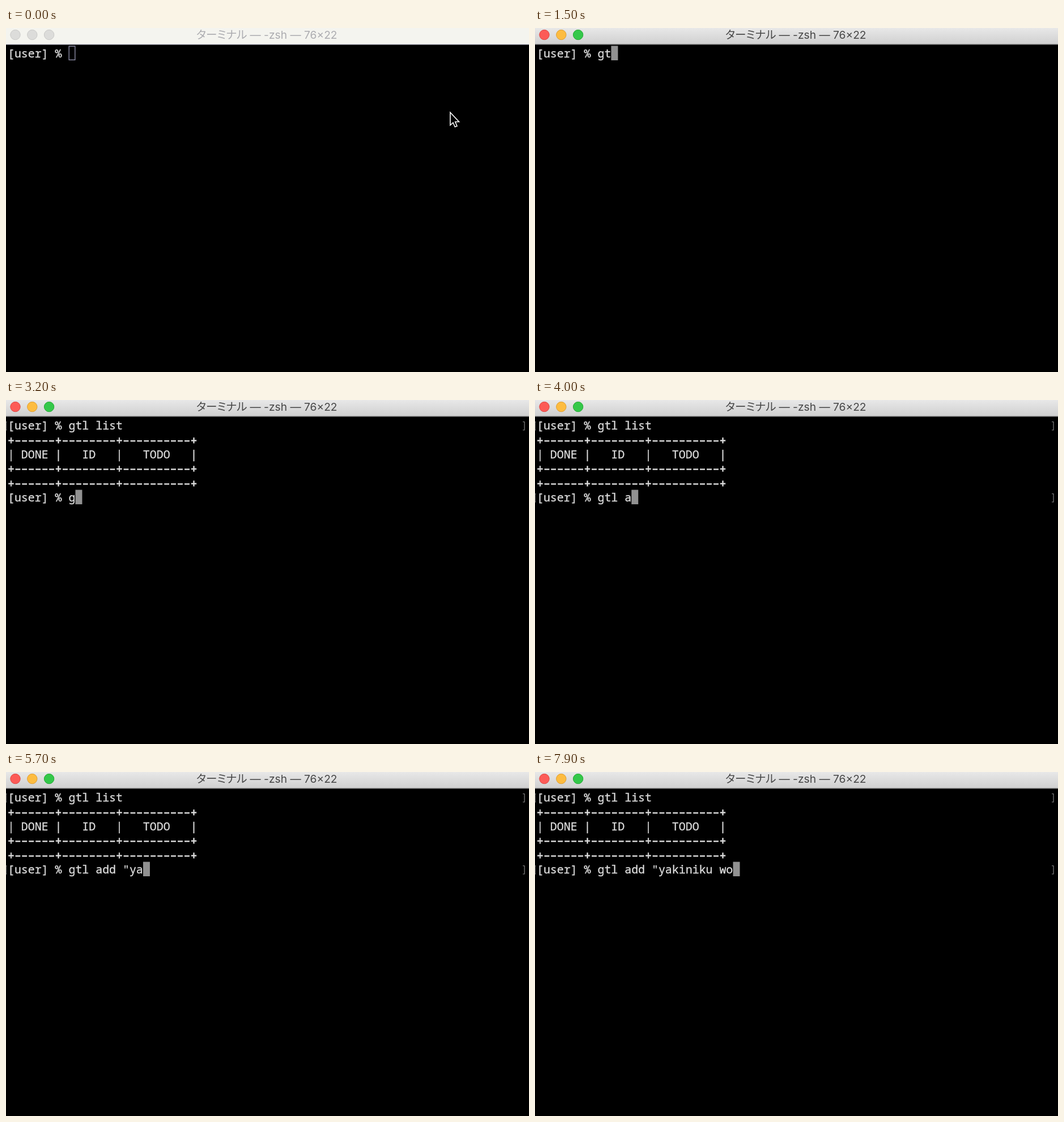
Write an HTML page that moves like this. It is 923 px wide and 607 px high and loops after 8000 ms.

```html
<!DOCTYPE html>
<html lang="ja">
<head>
<meta charset="utf-8">
<style>
  html, body { margin: 0; width: 100%; height: 100%; overflow: hidden; background: #000; }
  svg { display: block; width: 923px; height: 607px; }
  .term text {
    font: 500 19.92px "Noto Sans Mono", "DejaVu Sans Mono", monospace;
    fill: #dcdcdc; stroke: #dcdcdc; stroke-width: .35; white-space: pre;
  }
  .term .rule { stroke-width: .8; }
  .title { font: 19.2px Inter, "Noto Sans CJK JP", "Noto Sans CJK", sans-serif; }
  .kana { font: 350 19.6px "Noto Sans CJK JP", "Noto Sans CJK", sans-serif; font-feature-settings: "palt"; }
  .mark { fill: none; stroke: #858585; stroke-width: 1.2; }
</style>
</head>
<body>
<svg viewBox="0 0 923 607">
  <defs>
    <linearGradient id="active" x2="0" y2="1">
      <stop stop-color="#e8e8e8"/><stop offset="1" stop-color="#d0d0d0"/>
    </linearGradient>
  </defs>
  <rect width="923" height="607"/>
  <rect id="bar" width="923" height="28"/>
  <rect id="edge" y="28" width="923" height="1.5"/>
  <g id="lights" stroke-width="1"></g>
  <g id="title">
    <text class="kana" x="336" y="19">ターミナル</text>
    <text class="title" x="430.5" y="19">— -zsh —</text>
    <text class="title" x="526" y="19">76×22</text>
  </g>
  <rect id="caret" width="12" height="25.5"/>
  <g id="screen" class="term"></g>
  <g id="marks" class="mark"></g>
  <path id="arrow" d="M784 149V171.5L789 167L792.3 174.5L796 173L792.8 165.5H799.5Z"
    fill="#000" stroke="#fff" stroke-width="1.6"/>
  <g id="beam" fill="none" stroke-linecap="round">
    <path id="beamOuter" stroke="#888" stroke-width="3.6"/>
    <path id="beamInner" stroke="#000" stroke-width="1.8"/>
  </g>
</svg>
<script>
const LOOP = 8000, FOCUS = 400, ENTER = 2500, MARK = 3400;
const LEFT = 2.95, COL = 11.95, TOP = 31.5, ROW = 25.4;
const PROMPT = '[user] % ';
const firstCommand = 'gtl list';
const firstTimes = [1400, 1500, 1600, 1700, 1800, 1900, 2000, 2100];
const secondCommand = 'gtl add "yakiniku wo';
const secondTimes = [3000, 3300, 3400, 3600, 4000, 4200, 4400, 4600, 5000, 5300,
  5600, 5800, 6000, 6200, 6400, 6500, 6800, 7100, 7500, 7800];

const $ = id => document.getElementById(id);
function add(parent, tag, attrs) {
  const node = document.createElementNS('http://www.w3.org/2000/svg', tag);
  for (const key in attrs) node.setAttribute(key, attrs[key]);
  return parent.appendChild(node);
}
function paint(id, attrs) {
  for (const key in attrs) $(id).setAttribute(key, attrs[key]);
}
const show = (node, on) => node.setAttribute('visibility', on ? 'visible' : 'hidden');

const lights = [['#fc5b57', '#df4744'], ['#fdbc40', '#de9f34'], ['#34c84a', '#27aa35']]
  .map((colors, i) => ({ colors, node: add($('lights'), 'circle', { cx: 16.5 + 29.8 * i, cy: 12, r: 8.7 }) }));

const rule = '+' + [6, 8, 10].map(n => '–'.repeat(n)).join('+') + '+';
const table = [rule, '| DONE |   ID   |   TODO   |', rule, rule];
const lines = ['', ...table, ''].map((text, row) => add($('screen'), 'text', {
  x: LEFT, y: TOP + row * ROW + 20.6, class: text === rule ? 'rule' : ''
}));

const marks = [0, 5].map(row => {
  const y = TOP + row * ROW + 7;
  return add($('marks'), 'path', { d: `M-1 ${y}H1.5M-1 ${y + 14.5}H1.5M.2 ${y}v14.5M912 ${y}h3v14.5h-3` });
});

const beamPath = 'M780.5 139.5Q785 139.5 785 143.5Q785 139.5 789.5 139.5M785 143.5V159' +
  'M780.5 163Q785 163 785 159Q785 163 789.5 163M783 152.5H787';
paint('beamOuter', { d: beamPath });
paint('beamInner', { d: beamPath });

const typed = (text, times, t) => text.slice(0, times.filter(at => at <= t).length);

function render(t) {
  const focused = t >= FOCUS, entered = t >= ENTER;
  paint('bar', { fill: focused ? 'url(#active)' : '#f4f4ef' });
  paint('edge', { fill: focused ? '#929292' : '#d2d2dc' });
  paint('title', { fill: focused ? '#464646' : '#acacb0' });
  for (const { colors, node } of lights) {
    node.setAttribute('fill', focused ? colors[0] : '#dcdcda');
    node.setAttribute('stroke', focused ? colors[1] : '#cacac8');
  }

  const first = PROMPT + typed(firstCommand, firstTimes, t);
  const rows = entered ? [first, ...table, PROMPT + typed(secondCommand, secondTimes, t)] : [first];
  lines.forEach((line, i) => { line.textContent = rows[i] || ''; });
  show(marks[0], entered);
  show(marks[1], t >= MARK);

  const inset = focused ? 0 : 0.7, row = rows.length - 1;
  paint('caret', {
    x: LEFT + rows[row].length * COL + inset, y: TOP + row * ROW + inset,
    width: 12 - 2 * inset, height: 25.5 - 2 * inset,
    fill: focused ? '#919191' : 'none', stroke: focused ? 'none' : '#8c8ca6', 'stroke-width': 1.4
  });
  show($('arrow'), !focused);
  show($('beam'), focused && t < firstTimes[0]);
}

const start = performance.now();
function tick() {
  render((performance.now() - start) % LOOP);
  requestAnimationFrame(tick);
}
render(0);
requestAnimationFrame(tick);
</script>
</body>
</html>
```
